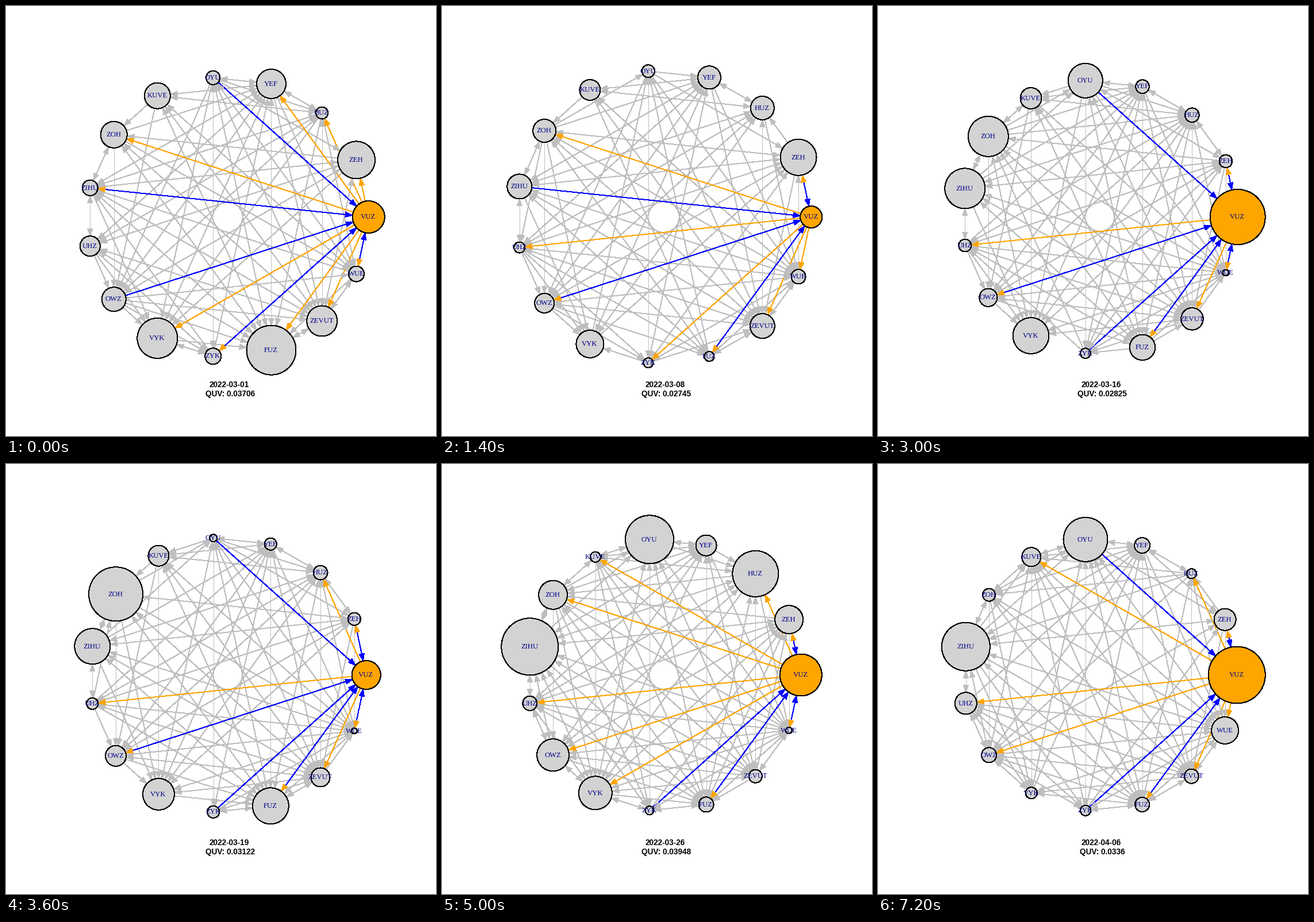
Recreate the animation shown at these times as a matplotlib script. Size 748 by 748 pixels, loop 7400 ms.

```python
import matplotlib.pyplot as plt
import numpy as np
from matplotlib.animation import FuncAnimation
from matplotlib.collections import LineCollection, PolyCollection
from matplotlib.patches import Circle

SIZE, DPI = 748, 100
PX = 72 / DPI  # points per pixel
DAYS, STEP_MS = 37, 200
CENTRE = np.array([388.5, 367.0])
REACH = 285.2  # ring half-width plus the largest node radius
HEAD, HALF = 12.5, 4.6
GRAY, ORANGE, BLUE = "#bebebe", "#ffa500", "#0000ff"

IDS = "abcdefghijklmno"
LABELS = ["VUZ", "ZEH", "HUZ", "YEF", "OYU", "KUVE", "ZOH", "ZIHU",
          "UHZ", "OWZ", "VYK", "ZYK", "FUZ", "ZEVUT", "WUE"]
N = len(IDS)

KEY_DAYS = [0, 7, 11, 18, 25, 31, 36]
INDEX = [0.03706, 0.02745, 0.02429, 0.03122, 0.03948, 0.03397, 0.0336]

# Node radii on each key day, in the order of IDS
RADII = np.array([
    [28, 32.5, 10.5, 25.5, 12, 22.5, 23, 13.5, 17.5, 21, 35, 14, 43, 26.5, 13.5],
    [19, 31.5, 20.5, 20, 11, 18, 20, 21.5, 9.5, 17, 24, 8.5, 8.5, 21.5, 12.5],
    [17.5, 11.5, 12, 13.5, 14, 19, 19, 14.5, 12, 12.5, 36.5, 6.5, 10, 23, 6],
    [25, 11, 12.5, 10.5, 6.5, 18, 47, 31, 10, 18, 27.5, 10.5, 31.5, 16.5, 5],
    [36.5, 24.5, 40, 18, 42, 9, 25, 49.5, 12.5, 28, 29, 7.5, 13, 11.5, 5.5],
    [27, 30, 14.5, 17.5, 52, 7.5, 16.5, 30.5, 26, 31, 7.5, 9, 10.5, 7.5, 11],
    [49.5, 19, 8.5, 13.5, 38.5, 16.5, 11, 42, 19, 13, 10, 9, 12.5, 12.5, 23.5],
])

# Short-lived swellings between key days: (day, radius)
PEAKS = {
    "a": [(9, 46), (15, 48), (20, 50)],
    "e": [(3, 25), (9, 28), (15, 30), (22, 53)],
    "h": [(3, 29), (9, 41), (15, 35), (34, 53)],
}

# For each key day: the nodes that point at a, at b, at c, ...
SOURCES = [
    "ehjlo aehijn adefhijn acefghijklm dlmno cdmno abfhmn abcdgilmno bcdhmn "
    "bcdefgi abcdehijl aeijk acdefghijkno abcdefghijmo acdefgjn",
    "bhjm aeghijklo bdfhijkn cefghijkl gklmn cdno abfhmno bcdgimno abcdghno "
    "abcdegino cdghijl abdeijo afghijno abcdefghijlmo abcdefghijmn",
    "behjlmo acehijlo bdfghijmno cefghijkl bdglmn cdgkmn abfhjklmn cdefgimno "
    "abcdfhln abcdfgino cdefghijln abcdeno acefghi bcdefghijkmo abcdefghijklmn",
    "bejlmo aceghijk abdefhijkmno cefhikmn dghkmn cdemno bfhimn bcgimno ahbcno "
    "abcdfgino bcdefghjno demn acdefghijklno abcdefghijklm abcdefghijkln",
    "blmo ahijklmn adefhijmn efghijkmn dfghklmn acdegmno abcdfhmn bcdgijklno "
    "abcdhjmno abcdghikno acdefghijlno efghkmo abcdfghijklno cdefghijko "
    "abcdefghijklmn",
    "belm aehijkno adefghlmn cefghijklmn dfghijklmno acdeghjklmno adfhkmno "
    "bcdgijlno abhjmno abcdeghiklmno fghjlmno efhjmno acdefghijklno "
    "abcdefghijklmo abcdefghijlmn",
    "belm adehjl abdmn cefghijklm dfghklmno aceghjklmno cefhmno bcdgijmo "
    "ahjklmno acdgikmno fghijmno ehijmo acdefghijlno abcdefghijmo abcdefghijmn",
]


def adjacency(text):
    return np.array([[s in group for group in text.split()] for s in IDS])


EDGES = np.array([adjacency(text) for text in SOURCES])
# Each edge flips at its own moment between two key days
FLIP = np.random.default_rng(4).uniform(0.05, 0.95, (len(KEY_DAYS), N, N))

angle = np.arange(N) * 2 * np.pi / N
ring = np.column_stack([np.cos(angle), -np.sin(angle)])
low, high = ring.min(axis=0), ring.max(axis=0)
RING = (2 * ring - low - high) / (high - low)


def radii_on(day):
    result = []
    for i, name in enumerate(IDS):
        keys = sorted(list(zip(KEY_DAYS, RADII[:, i])) + PEAKS.get(name, []))
        result.append(np.interp(day, *zip(*keys)))
    return np.array(result)


def edges_on(day):
    k = min(np.searchsorted(KEY_DAYS, day, side="right") - 1, len(KEY_DAYS) - 2)
    part = (day - KEY_DAYS[k]) / (KEY_DAYS[k + 1] - KEY_DAYS[k])
    return np.where(part > FLIP[k], EDGES[k + 1], EDGES[k])


def date_on(day):
    month, date = (3, day + 1) if day < 31 else (4, day - 30)
    return f"2022-{month:02d}-{date:02d}"


def arrow(p, q, r_from, r_to):
    """Line and filled head of an edge clipped at both node rims."""
    u = (q - p) / np.hypot(*(q - p))
    side = np.array([-u[1], u[0]]) * HALF
    tip = q - u * r_to
    base = tip - u * HEAD
    return (p + u * r_from, base + u), (tip, base + side, base - side)


fig = plt.figure(figsize=(SIZE / DPI, SIZE / DPI), dpi=DPI, facecolor="white")
ax = fig.add_axes([0, 0, 1, 1])
ax.set_xlim(0, SIZE)
ax.set_ylim(SIZE, 0)
ax.axis("off")

lines = LineCollection([], linewidths=PX, antialiaseds=False, zorder=1)
heads = PolyCollection([], linewidths=0, antialiaseds=False, zorder=2)
ax.add_collection(lines, autolim=False)
ax.add_collection(heads, autolim=False)

nodes, names = [], []
for i, label in enumerate(LABELS):
    fill = ORANGE if i == 0 else "#d3d3d3"
    nodes.append(ax.add_patch(Circle((0, 0), 1, fc=fill, ec="black", lw=PX,
                                     antialiased=False, zorder=3)))
    names.append(ax.text(0, 0, label, family="Liberation Serif", size=12.6 * PX,
                         color="#00008b", ha="center", va="baseline", zorder=4))

caption = dict(family="Liberation Sans", weight="bold", size=13.6 * PX,
               ha="center", va="baseline")
date_text = ax.text(388.5, 663, "", **caption)
index_text = ax.text(390, 679, "", **caption)


def draw(day):
    r = radii_on(day)
    pos = CENTRE + RING * (REACH - r.max())

    layers = {GRAY: [], ORANGE: [], BLUE: []}
    for s, t in np.argwhere(edges_on(day)):
        color = ORANGE if s == 0 else BLUE if t == 0 else GRAY
        layers[color].append(arrow(pos[s], pos[t], r[s], r[t]))
    colors = [c for c, group in layers.items() for _ in group]
    arrows = [a for group in layers.values() for a in group]
    lines.set_segments([a[0] for a in arrows])
    lines.set_color(colors)
    heads.set_verts([a[1] for a in arrows])
    heads.set_facecolor(colors)

    for node, name, (x, y), radius in zip(nodes, names, pos, r):
        node.set_center((x, y))
        node.set_radius(radius)
        name.set_position((x - 0.5, y + 3.3))

    date_text.set_text(date_on(day))
    index_text.set_text(f"QUV: {round(float(np.interp(day, KEY_DAYS, INDEX)), 5)}")
    return [lines, heads, *nodes, *names, date_text, index_text]


anim = FuncAnimation(fig, draw, frames=DAYS, interval=STEP_MS,
                     init_func=lambda: [], repeat=True, repeat_delay=0)
plt.show()
```
